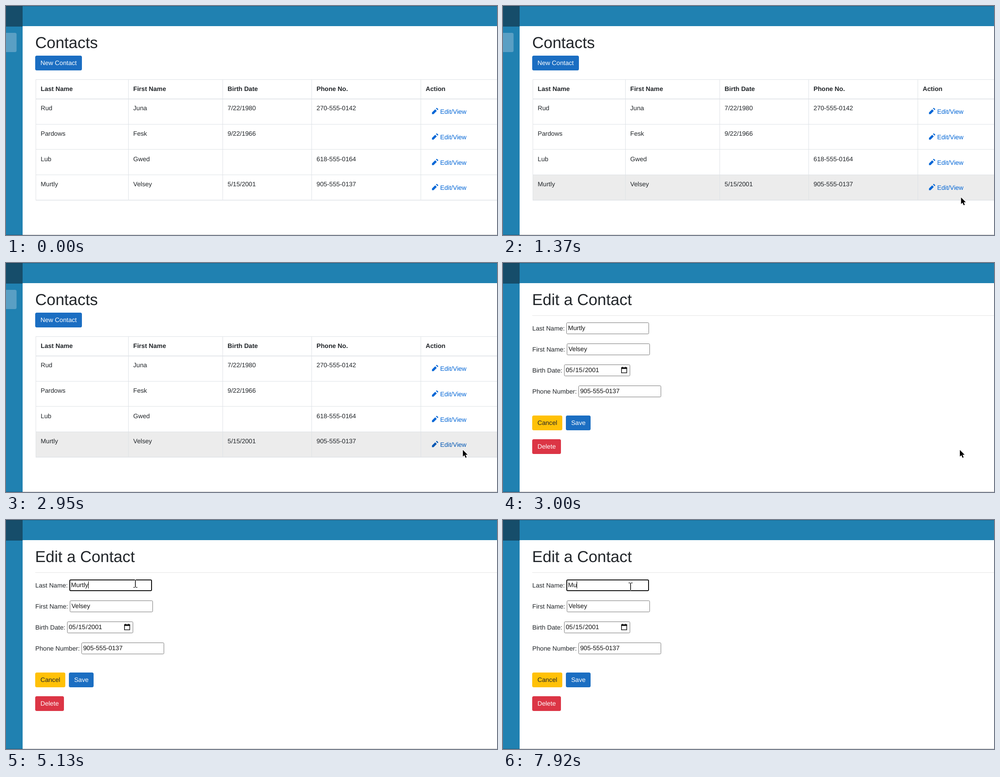
An HTML page with a canvas for the animation above (8000 ms loop, 1093 px wide and 512 px high).

```html
<!DOCTYPE html>
<html lang="en">
<head>
<meta charset="utf-8">
<title>Contacts</title>
<style>
html, body { margin: 0; width: 100%; height: 100%; overflow: hidden; background: #fff; }
canvas { display: block; }
</style>
</head>
<body>
<canvas id="stage" width="1093" height="512"></canvas>
<script>
const W = 1093, H = 512, LOOP = 8000;
const ctx = document.getElementById('stage').getContext('2d');
const FONT = '"Liberation Sans", Arial, sans-serif';
const INK = '#212529', BLUE = '#1b6ec2', LINE = '#dee2e6';
const BODY = 14.12, TITLE = 35.35, LEFT = 65;
const ROW = 56.6, FIELD_GAP = 47;

const ENTER = 910, OPEN = 3000, BEAM = 4800;
const clicks = [5130, 5650], deletes = [7020, 7190, 7230, 7920];
const BLINK = 530;

const columns = [
  { name: 'Last Name', edge: 66 },
  { name: 'First Name', edge: 272 },
  { name: 'Birth Date', edge: 482 },
  { name: 'Phone No.', edge: 680 },
  { name: 'Action', edge: 923 }
];
const rows = [
  ['Rud', 'Juna', '7/22/1980', '270-555-0142'],
  ['Pardows', 'Fesk', '9/22/1966', ''],
  ['Lub', 'Gwed', '', '618-555-0164'],
  ['Murtly', 'Velsey', '5/15/2001', '905-555-0137']
];
const contact = rows[3];

const easeOut = k => 1 - (1 - k) ** 1.24;
const smooth = k => k * k * (3 - 2 * k);

// Each move runs from the previous stop to its own
const moves = [
  { from: 0, to: 0, x: 1067, y: 512 },
  { from: ENTER, to: 1580, x: 1005, y: 402, ease: easeOut },
  { from: 2320, to: 2320, x: 1018, y: 410 },
  { from: 2810, to: 2900, x: 1017, y: 418 },
  { from: 3980, to: 4380, x: 321, y: 96, ease: smooth },
  { from: 4380, to: 4480, x: 300, y: 92 },
  { from: 4480, to: 4770, x: 289, y: 125, ease: smooth },
  { from: BEAM, to: BEAM, x: 288, y: 142 },
  { from: 5130, to: 5210, x: 283, y: 134 },
  { from: 5670, to: 5800, x: 281, y: 136 },
  { from: 6060, to: 6180, x: 284, y: 149 }
];

function pointer(t) {
  let { x, y } = moves[0];
  for (const m of moves) {
    if (t < m.from) break;
    const k = t >= m.to ? 1 : (t - m.from) / (m.to - m.from);
    const e = m.ease ? m.ease(k) : k;
    x += (m.x - x) * e;
    y += (m.y - y) * e;
  }
  return { x, y };
}

function rect(x, y, w, h, color) {
  ctx.fillStyle = color;
  ctx.fillRect(x, y, w, h);
}

function round(x, y, w, h, r, color) {
  ctx.fillStyle = color;
  ctx.beginPath();
  ctx.roundRect(x, y, w, h, r);
  ctx.fill();
}

function outline(x, y, w, h, color, line) {
  ctx.strokeStyle = color;
  ctx.lineWidth = line;
  ctx.beginPath();
  ctx.roundRect(x + line / 2, y + line / 2, w - line, h - line, 2);
  ctx.stroke();
}

// Draws text and returns its width
function label(str, x, y, color = INK, size = BODY, weight = 400) {
  ctx.font = `${weight} ${size}px ${FONT}`;
  ctx.textRendering = 'geometricPrecision';
  ctx.fillStyle = color;
  ctx.fillText(str, x, y);
  return ctx.measureText(str).width;
}

function button(str, x, y, w, fill, color = '#fff') {
  round(x, y, w, 33, 3.5, fill);
  label(str, x + 11.7, Math.round(y + 20.8), color);
}

function shape(path, x, y, scale, fill, edge) {
  const p = new Path2D(path);
  ctx.save();
  ctx.translate(x, y);
  ctx.scale(scale, scale);
  if (edge) {
    ctx.strokeStyle = edge;
    ctx.lineWidth = 1.6;
    ctx.stroke(p);
  }
  ctx.fillStyle = fill;
  ctx.fill(p);
  ctx.restore();
}

function pencil(x, y, color) {
  shape('M6 0l-1 1 2 2 1-1-2-2zm-2 2l-4 4v2h2l4-4-2-2z', x, y, 1.77, color);
}

function arrow({ x, y }) {
  shape('M0 0v14.8l3.4-3 2.6 5.8 2.4-1.1-2.5-5.7h4.7z', x, y, 1, '#000', '#fff');
}

function beam({ x, y }) {
  x = Math.round(x);
  y = Math.round(y);
  rect(x - 1.5, y - 9, 3, 18, '#fff');
  rect(x - 0.8, y - 8, 1.6, 16, '#111');
  for (const dy of [-9, 8]) {
    for (const dx of [-4.5, 0.8]) rect(x + dx, y + dy, 3.7, 1.2, '#111');
  }
}

function shell() {
  rect(0, 0, W, H, '#fff');
  rect(0, 0, W, 45, '#2081b1');
  rect(0, 45, 37, H - 45, '#2081b1');
  rect(0, 0, 37, 46, '#164d6a');
  for (const y of [0, H - 1]) rect(0, y, W, 1, 'rgba(0,0,0,.22)');
}

function listPage(t) {
  const pos = pointer(t);
  const shown = t >= ENTER;
  const top = 164, head = 207, bottom = head + 4 * ROW;

  round(-4, 60, 27.5, 43, 3.5, '#5a9fc4');
  label('Contacts', LEFT, 94, INK, TITLE);
  button('New Contact', LEFT, 111, 104, BLUE);

  if (shown && pos.y < 434) rect(66, 377, W, 57, '#ececec');
  for (let i = 0; i < 4; i++) {
    rect(66, Math.round(head + i * ROW), W, i ? 1 : 1.6, LINE);
  }
  rect(66, top, W, 1, LINE);
  rect(66, bottom, W, 1.4, LINE);
  for (const { name, edge } of columns) {
    rect(edge, top, 1, bottom - top, LINE);
    label(name, edge + 11.3, 190, INK, BODY, 700);
  }

  rows.forEach((row, i) => {
    const y = Math.round(head + 26.4 + i * ROW);
    row.forEach((cell, c) => label(cell, columns[c].edge + 11.3, y));
    const hover = shown && i === 3 && pos.y < 423;
    const color = hover ? '#0056b3' : '#0366d6';
    pencil(948.3, y - 5.5, color);
    label('Edit/View', 966.5, y + 8, color);
  });
  if (shown) arrow(pos);
}

// Draws one form line and returns the box's left and top
function field(row, name, value, w, focus) {
  const y = 133 + row * FIELD_GAP;
  const x = Math.round(LEFT + label(name, LEFT + 0.3, y + 17.5) + 4.1);
  outline(x, y, w, 26, focus ? '#101010' : '#767676', focus ? 2 : 1);
  label(value, x + 3.7, y + 17, '#111');
  return { x, y };
}

function dateField(row, name, parts) {
  const box = field(row, name, '', 147);
  let x = box.x + 3.7;
  for (const part of parts) x += label(part, x, box.y + 17, '#111') + 0.9;

  const cx = box.x + 127, cy = box.y + 5;
  for (const dx of [2.3, 9.3]) rect(cx + dx, cy, 1.6, 3, '#111');
  rect(cx, cy + 1.4, 13.2, 3.4, '#111');
  ctx.strokeStyle = '#111';
  ctx.lineWidth = 1.5;
  ctx.strokeRect(cx + 0.75, cy + 2.2, 11.7, 11.3);
}

function formPage(t) {
  label('Edit a Contact', LEFT - 0.2, 94, INK, TITLE);
  rect(LEFT, 117, W, 1, '#e5e5e5');

  const past = time => t >= time;
  const focus = past(clicks[0]);
  const typed = contact[0].slice(0, contact[0].length - deletes.filter(past).length);
  const box = field(0, 'Last Name:', typed, 184, focus);
  if (focus) {
    const since = t - [...clicks, ...deletes].filter(past).pop();
    const caretX = box.x + 3.7 + ctx.measureText(typed).width;
    if (Math.floor(since / BLINK) % 2 === 0) rect(Math.round(caretX), box.y + 4, 1, 16, '#000');
  }
  field(1, 'First Name:', contact[1], 185);
  dateField(2, 'Birth Date:', ['05', '/', '15', '/', '2001']);
  field(3, 'Phone Number:', contact[3], 184);

  button('Cancel', LEFT, 341, 67, '#ffc107', INK);
  button('Save', 140, 341, 55, BLUE);
  button('Delete', LEFT, 394, 64, '#dc3545');

  (t < BEAM ? arrow : beam)(pointer(t));
}

const start = performance.now();
function tick() {
  const t = (performance.now() - start) % LOOP;
  shell();
  (t < OPEN ? listPage : formPage)(t);
  requestAnimationFrame(tick);
}
tick();
</script>
</body>
</html>
```
